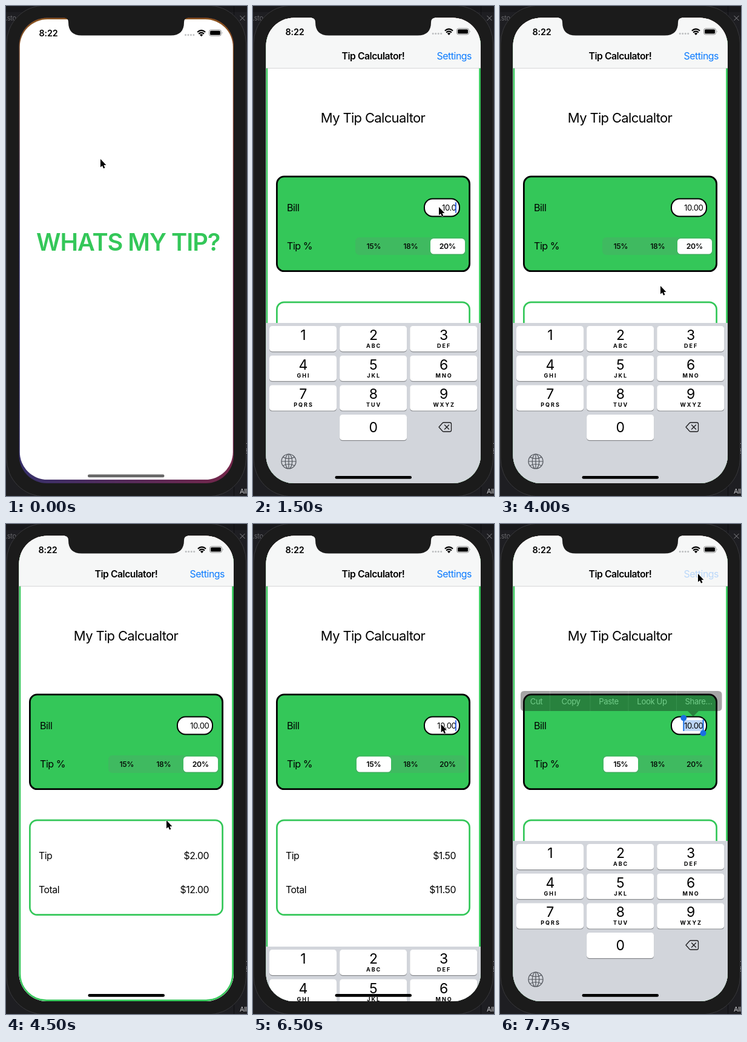
Animation, 398 px wide and 807 px high, one loop 8 s. Source, as an HTML page:

```html
<!DOCTYPE html>
<html lang="en">
<head>
<meta charset="utf-8">
<title>Tip calculator</title>
<style>
  html, body { margin: 0; width: 100%; height: 100%; overflow: hidden; background: #1e1e22; }
  svg { display: block; width: 398px; height: 807px; }
  text { font-family: Inter, "Liberation Sans", sans-serif; letter-spacing: -.03em; }
  .mid { text-anchor: middle; }
  .end { text-anchor: end; }
  .letters { letter-spacing: 2px; font-weight: 700; }
</style>
</head>
<body>
<svg id="stage" viewBox="0 0 398 807" xmlns="http://www.w3.org/2000/svg"></svg>
<script>
const GREEN = '#34c759', BLUE = '#0a7aff', MARK = '#1a6fe3';
const LOOP = 8000, STEP = 250;

const rect = (x, y, w, h, r, fill, more = '') =>
  `<rect x="${x}" y="${y}" width="${w}" height="${h}" rx="${r}" fill="${fill}" ${more}/>`;
// Text placed by the vertical centre of its capitals
const text = (s, x, cy, size, more = '') =>
  `<text x="${x}" y="${cy + size * 0.364}" font-size="${size}" ${more}>${s}</text>`;
const line = (d, stroke, width, more = '') =>
  `<path d="${d}" fill="none" stroke="${stroke}" stroke-width="${width}" ${more}/>`;

function keyboard() {
  const letters = ['', 'ABC', 'DEF', 'GHI', 'JKL', 'MNO', 'PQRS', 'TUV', 'WXYZ'];
  const key = (col, row) => {
    const x = 27 + col * 116.1, y = 527 + row * 48.7;
    return rect(x, y + 1, 111, 42.2, 4.7, '#898b8f') + rect(x, y, 111, 42, 4.7, '#fff');
  };
  let out = rect(21, 522, 356, 270, 0, '#d2d5db');
  letters.forEach((abc, i) => {
    const col = i % 3, row = Math.floor(i / 3);
    const x = 82.5 + col * 116.1, y = 541.5 + row * 48.7;
    out += key(col, row) + text(i + 1, x, y, 23, 'class="mid"') +
      text(abc, x + 1, y + 18.2, 9, 'class="mid letters"');
  });
  out += key(1, 3) + text(0, 198.5, 694, 23, 'class="mid"');
  out += line('M307 693.5 L313 686.8 Q313.8 686 315 686 H325 Q327.5 686 327.5 688.5 V698.5 Q327.5 701 325 701 H315 Q313.8 701 313 700.2 Z M316.5 690 l7 7 m0 -7 l-7 7',
    '#1c1c1e', 1.3, 'stroke-linejoin="round" stroke-linecap="round"');
  out += line('M47 750 a12 12 0 1 0 24 0 a12 12 0 1 0 -24 0 M53.3 750 a5.7 12 0 1 0 11.4 0 a5.7 12 0 1 0 -11.4 0 M59 738 V762 M47 750 H71 M49.5 743 Q59 748 68.5 743 M49.5 757 Q59 752 68.5 757',
    '#50545b', 1.2);
  return out;
}

function menu() {
  const items = [['Cut', 60], ['Copy', 117], ['Paste', 179.5], ['Look Up', 251], ['Share…', 328]];
  return '<path d="M40 275 H360 Q366.500 275 366.500 281 V302 Q366.500 308 360 308 H328 L319 317 L310 308 H40 Q34 308 34 302 V281 Q34 275 40 275 Z" fill="#151515"/>' +
    line('M82.500 275 V308 M149 275 V308 M212 275 V308 M291.500 275 V308', '#444', 0.8) +
    items.map(([s, x]) => text(s, x, 291.8, 13.2, 'class="mid" fill="#d6d6d6"')).join('');
}

const statusBar = text('8:22', 53.5, 42.3, 14.4, 'font-weight="600" style="letter-spacing:-.01em"') +
  [297.2, 301.7, 306.2, 310.7].map(x => `<circle cx="${x}" cy="45.500" r="1.500" fill="#bcbec0"/>`).join('') +
  line('M316.900 40.800 Q323.500 34.800 330.100 40.800 M319.100 43.600 Q323.500 39.600 327.900 43.600', '#000', 2.1) +
  '<path d="M320.800 45.200 Q323.500 43 326.200 45.200 L323.500 48 Z"/>' +
  rect(336.5, 37, 20, 10, 3, 'none', 'stroke="#8b8b8b" stroke-width="1"') +
  rect(338, 38.5, 17, 7, 1.6, '#000') +
  '<path d="M358 40.300 Q359.600 42 358 43.700 Z" fill="#8b8b8b"/>';

const navBar = rect(21, 19, 356, 83, 0, '#f6f7f7') + rect(21, 102, 356, 0.7, 0, '#c4c4c6') +
  text('Tip Calculator!', 198.5, 82.3, 15.7, 'class="mid" font-weight="600"') +
  text('Settings', 361, 82.3, 15.9, `id="settings" class="end" fill="${BLUE}"`);

const billCard = rect(39.4, 280.9, 318.2, 155.8, 12, GREEN, 'stroke="#000" stroke-width="2.8"') +
  text('Bill', 56, 332.5, 16.1) + text('Tip %', 56, 395.5, 16.1) +
  rect(283, 317.5, 58, 29, 13.5, '#fff', 'stroke="#000" stroke-width="2"') +
  rect(303, 323, 33, 18, 0, '#bcd4f6', 'id="selected"') +
  text('10.00', 335.5, 332, 13.2, 'id="bill" class="end"') +
  rect(334, 323, 2, 18, 1, '#3a6cf0', 'id="caret"') +
  `<g id="handles" fill="${MARK}">${rect(302.3, 321, 2, 20, 0, MARK)}${rect(334.6, 322, 2, 20, 0, MARK)}
    <circle cx="303.300" cy="319.500" r="5"/><circle cx="335.500" cy="344.500" r="5"/></g>` +
  rect(169, 381, 183, 29, 6.5, 'rgba(118,118,128,.16)') +
  `<g id="thumb">${rect(171, 384, 57, 25.5, 5.3, 'rgba(0,0,0,.13)')}${rect(171, 383, 57, 25.5, 5.3, '#fff')}</g>` +
  ['15%', '18%', '20%'].map((s, i) => text(s, 199.3 + i * 61, 395.6, 12.3, 'class="mid seg"')).join('');

const totalCard = rect(39.4, 487.8, 318.2, 155.8, 12, '#fff', `stroke="${GREEN}" stroke-width="2.700"`) +
  text('Tip', 54, 546, 15.8) + text('Total', 54, 602, 15.8) +
  text('', 335, 546, 15.8, 'id="tip" class="end"') + text('', 335, 602, 15.8, 'id="total" class="end"');

document.getElementById('stage').innerHTML = `
  <defs>
    <clipPath id="glass">${rect(21.5, 19.5, 354.5, 766.5, 46, '#000')}</clipPath>
    <linearGradient id="wall">
      <stop offset="0" stop-color="#37306a"/><stop offset="1" stop-color="#74264a"/>
    </linearGradient>
    <linearGradient id="glow" x2="0" y2="1">
      <stop offset="0" stop-color="#8a531d"/><stop offset=".5" stop-color="#8a531d" stop-opacity="0"/>
    </linearGradient>
  </defs>
  ${rect(0, 0, 398, 807, 0, '#1e1e22')}
  ${rect(0, 0, 398, 10, 0, '#18181b')}
  ${line('M376.500 0 V40 M376.500 780 V807', '#0e0e10', 1)}
  ${text('.sto', -1, 20, 11, 'fill="#66666a"')}
  ${line('M386.500 16 l8 8 m0 -8 l-8 8', '#8a8a8e', 1)}
  ${text('All', 386, 799, 11, 'fill="#c9c9cc"')}
  ${text('L', 395, 717, 11, 'fill="#c9c9cc"')}${text('8', 395, 733, 11, 'fill="#c9c9cc"')}
  ${rect(0.9, -1, 395.6, 809, 63, '#1b1b1b', 'stroke="#38383b" stroke-width="1"')}
  ${rect(21.5, 19.5, 354.5, 766.5, 46, 'url(#wall)')}
  ${rect(21.5, 19.5, 354.5, 766.5, 46, 'url(#glow)')}
  <g id="screen"><g clip-path="url(#glass)">
    ${rect(21, 19, 356, 768, 0, '#fff')}
    ${text('WHATS MY TIP?', 201.7, 390, 40, `class="mid" font-weight="600" fill="${GREEN}" style="letter-spacing:-.026em"`)}
    <g id="main">
      ${rect(21, 19, 356, 768, 0, '#fff')}
      ${rect(22.8, 0, 351.8, 784.6, 44, 'none', `stroke="${GREEN}" stroke-width="2.800"`)}
      ${text('My Tip Calcualtor', 198, 184, 22, 'class="mid"')}
      ${billCard}${totalCard}${navBar}
      <g id="menu">${menu()}</g>
      <g id="keys">${keyboard()}</g>
    </g>
    ${statusBar}
  </g></g>
  ${rect(135.5, 774, 126.5, 4.7, 2.3, '#000', 'id="home"')}
  <path d="M97 18 V19.500 Q103 20 103 27 Q103 48.500 125 48.500 H272 Q294 48.500 294 27 Q294 20 300 19.500 V18 Z" fill="#1b1b1b"/>
  <path id="pointer" d="M0 0 V13.600 L3 10.900 L5.100 15.600 L7.400 14.600 L5.400 9.900 H9.400 Z" stroke="#fff" stroke-width="1" paint-order="stroke"/>`;

const el = id => document.getElementById(id);
const segs = [...document.querySelectorAll('.seg')];

// Pointer: time, x, y
const path = [
  [0, 156, 252], [250, 160, 262], [500, 172, 288], [750, 196, 320], [1250, 299, 326],
  [1750, 315, 336], [2250, 322, 341], [3000, 322, 341], [3500, 300, 400], [3750, 281, 428],
  [4000, 265, 461], [4500, 265, 488], [5000, 228, 440], [5500, 197, 396], [5750, 200, 394],
  [6250, 311, 330], [7000, 310, 329], [7250, 318, 225], [7500, 325, 105], [7750, 327, 82]
];
// Keyboard: time, distance below its resting place
const slide = [
  [500, 264], [750, 11.5], [1000, 0], [4000, 0], [4250, 130],
  [4500, 264], [6250, 264], [6500, 174], [6750, 0]
];

function at(track, t, k) {
  const n = track.findIndex(p => p[0] > t);
  if (n === 0) return track[0][k];
  if (n < 0) return track[track.length - 1][k];
  const a = track[n - 1], b = track[n];
  return a[k] + (b[k] - a[k]) * (t - a[0]) / (b[0] - a[0]);
}

const fade = (id, value) => el(id).setAttribute('opacity', value);
const move = (id, value) => el(id).setAttribute('transform', value);

function draw(t) {
  const opening = t < 250, low = t >= 5500, picked = t >= 7000;
  const editing = t < 4000 || (t >= 6500 && !picked);
  move('screen', opening ? 'translate(198.700 250) scale(.993 .989) translate(-198.700 -250)' : '');
  move('home', opening ? 'translate(-.500 -2.500)' : '');
  fade('home', opening ? 0.6 : 1);
  fade('main', t < 750 ? 0 : t < 1000 ? 0.93 : 1);
  move('keys', `translate(0 ${at(slide, t, 1)})`);
  el('bill').textContent = t < 2000 ? '10.0' : '10.00';
  fade('caret', editing && t % 1000 >= 500 ? 1 : 0);
  fade('selected', picked ? 1 : 0);
  fade('handles', picked ? 1 : 0);
  fade('menu', !picked ? 0 : t < 7750 ? 1 : 0.38);
  fade('settings', t < 7750 ? 1 : 0.25);
  move('thumb', `translate(${low ? 0 : 122} 0)`);
  segs.forEach((s, i) => s.setAttribute('font-weight', i === (low ? 0 : 2) ? 600 : 500));
  el('tip').textContent = low ? '$1.50' : '$2.00';
  el('total').textContent = low ? '$11.50' : '$12.00';
  move('pointer', `translate(${at(path, t, 1)} ${at(path, t, 2)})`);
}

const start = performance.now();
let last = -1;
function tick() {
  const now = (performance.now() - start) % LOOP;
  const t = Math.floor(now / STEP) * STEP;
  if (t !== last) draw(last = t);
  requestAnimationFrame(tick);
}
tick();
</script>
</body>
</html>
```
